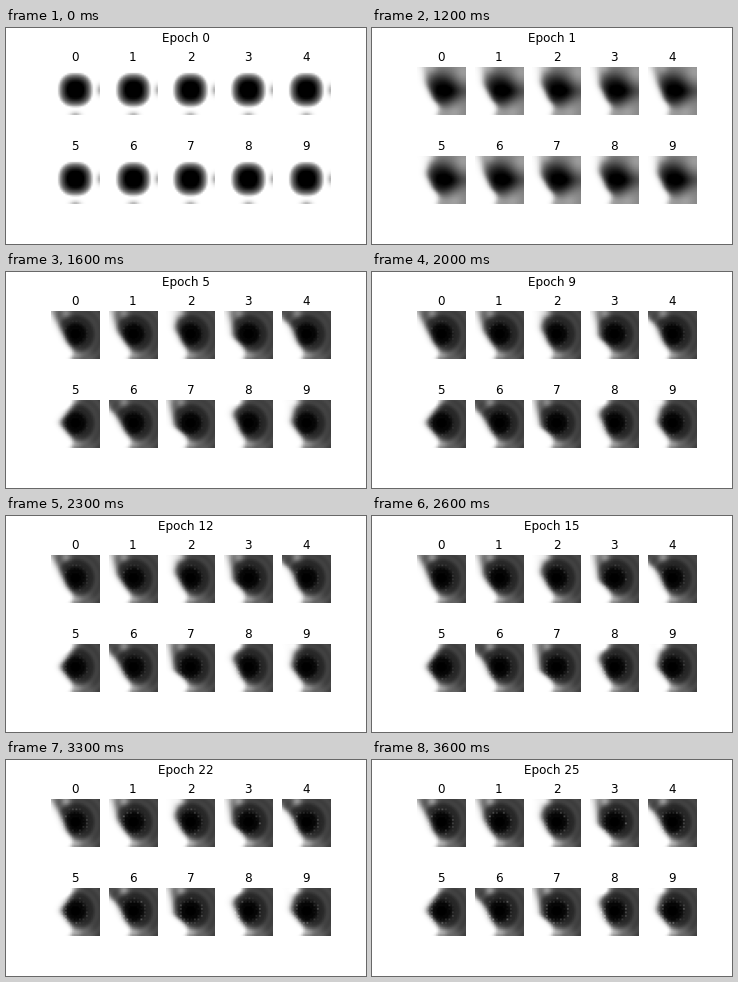
A matplotlib script for the animation above (4700 ms loop, 360 px wide and 216 px high).

```python
import numpy as np
import matplotlib.pyplot as plt
from matplotlib.animation import FuncAnimation

N = 28
STEP_MS = 100
FRAMES = 47
HOLD = 11          # steps before training starts
LAST_EPOCH = 25

Y, X = np.mgrid[:N, :N].astype(float)
DX, DY = X - 13.5, Y - 13.2
R = np.hypot(DX, DY)
BOX_R = (np.abs(DX) ** 2.4 + np.abs(DY) ** 2.4) ** (1 / 2.4)

# Left outline per digit: x where it starts at the top, y of its bulge
TOP = [0, 2, 7, 3, -5, 14, -5, 2, 10, 8]
BULGE = [9, 12, 10, 15, 9, 13, 10, 16, 8, 13]

rng = np.random.default_rng(4)
DOTS = rng.random((10, N, N)) * ((X % 2 == 0) & (Y % 2 == 0))
DOTS *= np.exp(-((R - 6.3) / 1.3) ** 2)


def sigmoid(z):
    return 1 / (1 + np.exp(-z))


def bump(cx, cy, rx, ry=None):
    return np.exp(-((X - cx) / rx) ** 2 - ((Y - cy) / (ry or rx)) ** 2)


def mix(a, b, t):
    return a + (b - a) * t


def outline(top, bulge):
    """Smooth column of x positions: top, bulge, then the neck."""
    x = np.interp(np.arange(N), [0, bulge, 19, 23, 27], [top, 4.5, 9, 12.5, 11])
    return np.convolve(np.pad(x, 2, mode="edge"), np.ones(5) / 5, "valid")[:, None]


CORE = sigmoid((4.9 - BOX_R) / .5)

START = np.interp(BOX_R, [4.5, 6, 8, 9.3, 10.2], [1, .85, .58, .28, 0])
START = np.maximum(START, .36 * bump(28, 13.2, 2.2, 3))
START = np.maximum(START, .36 * bump(13.5, 28, 3, 2))

EARLY_TONE = (.48 + .5 * np.exp(-(R / 9.5) ** 2.6)
              + .16 * np.exp(-((Y - 14) / 4.5) ** 2) * sigmoid((X - 16) / 2)
              - .1 * bump(26, 3, 5) - .08 * bump(21, 25, 5))
LATE_TONE = .74 + .25 * np.exp(-(R / 9) ** 3) + .02 * np.cos(1.3 * R)
LIGHT = (.35 * bump(8, 1, 3) + .35 * bump(14, 25.5, 3.5)
         + .15 * bump(20, 26, 4))


def sample(digit, epoch):
    """Generated image for one digit, 0 is white and 1 is black."""
    if epoch == 0:
        return START
    grown = 1 - np.exp(-.9 * (epoch - 1))
    late = np.clip((epoch - 3) / 22, 0, 1)
    shape = mix(.25, 1, grown)
    edge = outline(mix(5, TOP[digit], shape), mix(9, BULGE[digit], shape))
    edge = edge + .2 * np.sin(1.7 * epoch + digit + Y / 4)
    soft = .9 + .7 * np.exp(-Y / 5)
    img = mix(EARLY_TONE, LATE_TONE, grown) * sigmoid((X - edge) / soft)
    img = img - (.3 + .4 * grown + .3 * late) * LIGHT
    img = img - .3 * (.2 * grown + .8 * late) * DOTS[digit]
    return np.clip(np.maximum(img, CORE), 0, 1)


fig, axes = plt.subplots(2, 5, figsize=(5, 3), dpi=72)
fig.subplots_adjust(left=.125, right=.9, bottom=.125, top=.88,
                    wspace=.2, hspace=.2)
title = fig.suptitle("Epoch 0", fontsize=12)
images = []
for digit, ax in enumerate(axes.flat):
    ax.set_title(str(digit), fontsize=12)
    ax.axis("off")
    images.append(ax.imshow(START, cmap="gray_r", vmin=0, vmax=1))


def update(i):
    epoch = min(max(i - HOLD, 0), LAST_EPOCH)
    title.set_text(f"Epoch {epoch}")
    for digit, im in enumerate(images):
        im.set_data(sample(digit, epoch))
    return [title, *images]


anim = FuncAnimation(fig, update, frames=FRAMES, interval=STEP_MS,
                     repeat=True, repeat_delay=0, blit=False)
plt.show()
```
